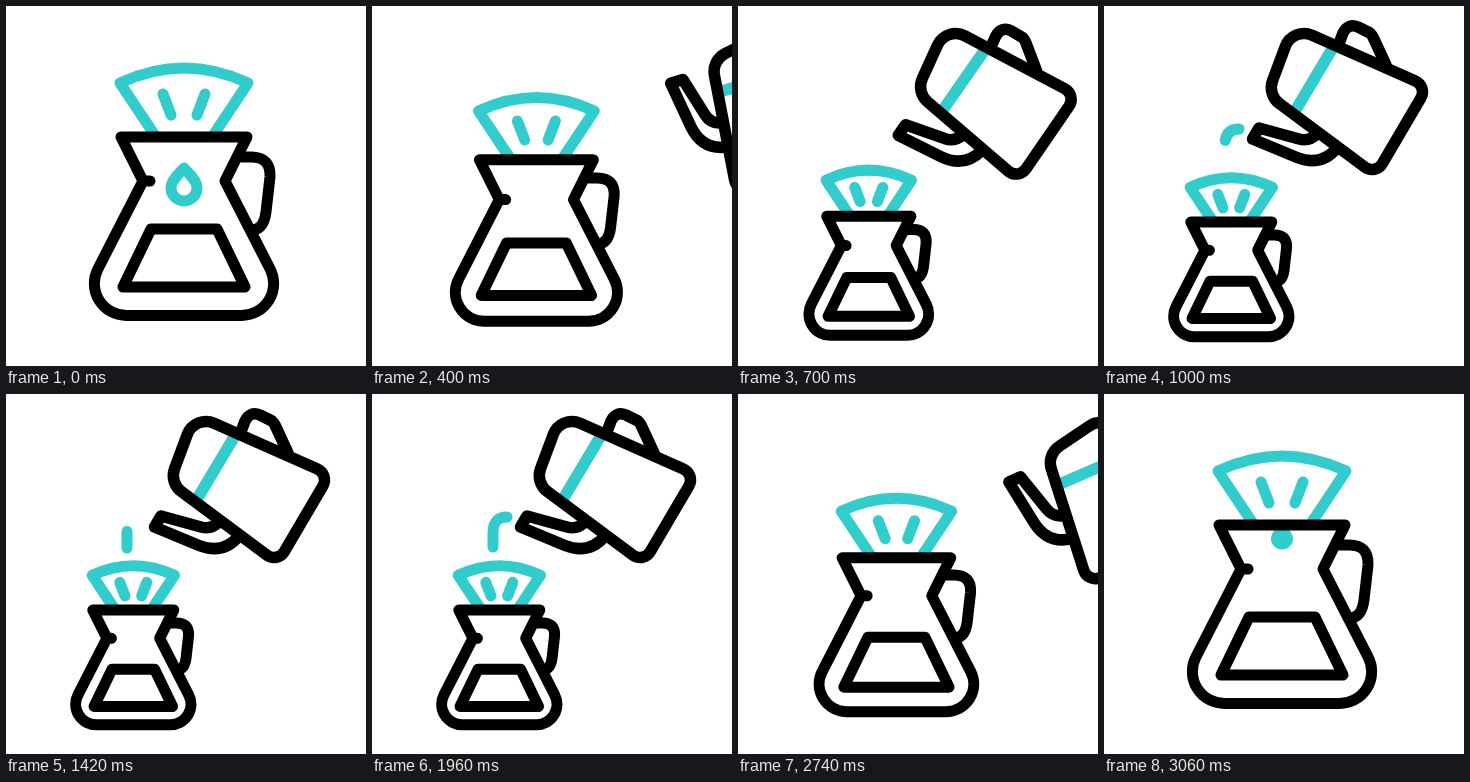
An HTML page that plays this animation: 360x360 px, repeating every 3.08 s.

```html
<!DOCTYPE html>
<html lang="en">
<head>
<meta charset="utf-8">
<title>Pour-over coffee</title>
<style>
  html, body { margin: 0; width: 100%; height: 100%; overflow: hidden; background: #fff; }
  svg { display: block; width: 100%; height: 100%; }
  svg * { fill: none; stroke-linecap: round; stroke-linejoin: round; }
  .teal { stroke: #33cccc; }
  .ink { stroke: #000; }
</style>
</head>
<body>
<svg viewBox="0 0 360 360" stroke-width="11">
  <g id="pot">
    <g class="teal">
      <path d="M148 128 L114 77 Q178 47 242 77 L208 128"/>
      <path d="M157 88 L165 109 M199 88 L191 109"/>
      <path id="drop" d="M0 -20 C4 -15 13 -8 13 0 A13 13 0 0 1 -13 0 C-13 -8 -4 -15 0 -20Z"/>
    </g>
    <g class="ink">
      <path d="M144 175 H137 L92 262.7 A32 32 0 0 0 120.5 309.5 H235.5 A32 32 0 0 0 264 262.7 L219 175 L241 131 H115 L137 175"/>
      <path d="M236 151 H245 Q265 151 264 171 L260 206 Q258 222 248 224"/>
      <path d="M145 223 H211 L239 281 H117Z"/>
    </g>
  </g>
  <path id="stream" class="teal" d="M135 123 Q121 123 121 139 V154"/>
  <g id="kettle" stroke-width="11.5">
    <path class="teal" d="M230.5 39 L190.5 106"/>
    <g class="ink">
      <path d="M168.6 74.5 L181.3 40.5 A20 20 0 0 1 208.1 29.2 L311.4 75 A12 12 0 0 1 316.8 92.1 L278.3 157.6 A12 12 0 0 1 260.9 161.2 L175.5 97.7 A20 20 0 0 1 168.6 74.5Z"/>
      <path d="M236 35 L239 27 Q244 17 254 21 L266 27 Q268 29 269 31 L282 59"/>
      <path d="M213 128 Q205 136 195 133 L155 122 L148.5 133 L193 151.5 Q217 161 233 142"/>
    </g>
  </g>
</svg>
<script>
  const LOOP = 3080, LINE = 11;
  const [pot, drop, stream, kettle] =
    ['pot', 'drop', 'stream', 'kettle'].map(id => document.getElementById(id));
  const streamLength = stream.getTotalLength();

  // Eased progress from 0 to 1 between two times
  const ease = (t, from, to) => {
    const u = Math.min(1, Math.max(0, (t - from) / (to - from)));
    return u * u * (3 - 2 * u);
  };
  const show = (el, on) => el.setAttribute('visibility', on ? 'visible' : 'hidden');
  const place = (el, value) => el.setAttribute('transform', value);

  // Lines keep their weight while the pot shrinks
  function drawPot(p) {
    const s = 1 - 0.357 * p;
    place(pot, `translate(${178 - 50.7 * p} ${309.5 + 21.3 * p}) scale(${s}) translate(-178 -309.5)`);
    pot.setAttribute('stroke-width', LINE / s);
    return s;
  }

  function drawDrop(t, s) {
    let y, k;
    if (t < 300) {
      const e = ease(t, 100, 300);
      y = 182 + 41 * e;
      k = 1 - e;
    } else {
      const e = ease(t, 2980, 3220);
      y = 131 + 51 * e;
      k = Math.min(1, 1.6 * e);
    }
    show(drop, k > 0.01);
    k = Math.max(k, 0.01);
    place(drop, `translate(178 ${y}) scale(${k})`);
    drop.setAttribute('stroke-width', LINE / s / k);
  }

  function drawKettle(p) {
    const q = 1 - p;
    const x = 243 + 206 * q, y = 95.5 + 45 * q - 28 * q * q;
    place(kettle, `translate(${x} ${y}) rotate(${58 * q}) translate(-243 -95.5)`);
    show(kettle, p > 0);
  }

  // Two pours: the head runs out, then the tail follows
  function drawStream(t) {
    const phase = (t - 800) / 800 % 1;
    const tail = ease(phase, 0.5, 1) * streamLength;
    const dash = ease(phase, 0, 0.5) * streamLength - tail;
    show(stream, t > 800 && t < 2400 && dash > 0.3);
    stream.setAttribute('stroke-dasharray', `${Math.max(0.01, dash)} 999`);
    stream.setAttribute('stroke-dashoffset', -tail);
  }

  function draw(t) {
    const p = ease(t, 197, 797) - ease(t, 2395, 2995);
    drawDrop(t, drawPot(p));
    drawKettle(p);
    drawStream(t);
  }

  const start = performance.now();
  function tick() {
    draw((performance.now() - start) % LOOP);
    requestAnimationFrame(tick);
  }
  tick();
</script>
</body>
</html>
```
